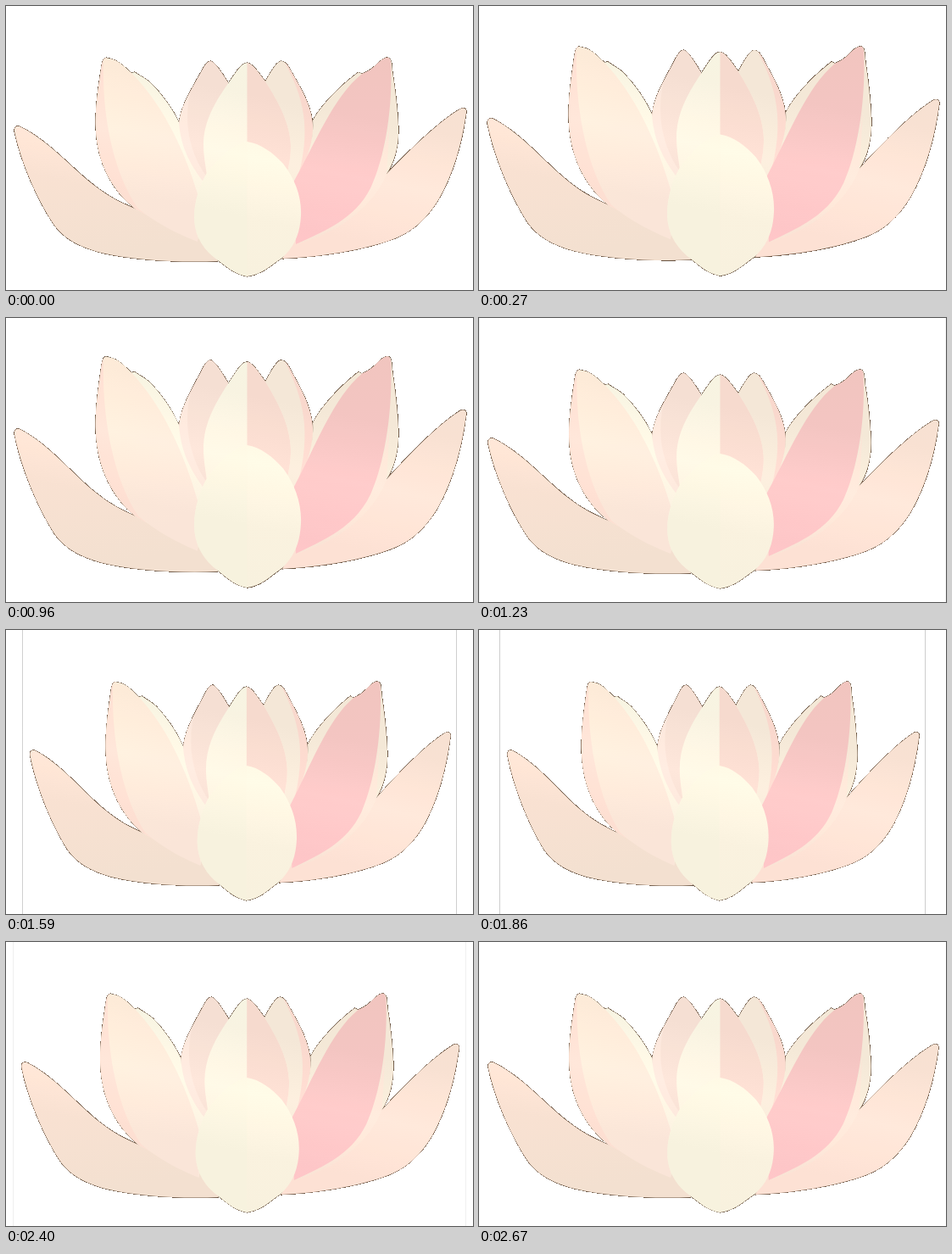
Write an HTML page that moves like this. It is 551x335 px and loops after 2.7 s.

```html
<!DOCTYPE html>
<html lang="en">
<head>
<meta charset="utf-8">
<title>Lotus</title>
<style>
  html, body { margin: 0; width: 100%; height: 100%; overflow: hidden; background: #fff; }
  svg { display: block; width: 551px; height: 335px; transform-origin: 50% 100%; }
  .edge { stroke: #66513f; stroke-width: 1.2; stroke-linejoin: round; shape-rendering: crispEdges; }
  .sheen { mix-blend-mode: color-dodge; }
</style>
</head>
<body>
<svg id="lotus" viewBox="0 0 551 335">
  <defs>
    <linearGradient id="outerLeft" x2="0.3" y2="1">
      <stop stop-color="#fce2d3"/><stop offset="1" stop-color="#f3e0d0"/>
    </linearGradient>
    <linearGradient id="outerRight" x1="1" x2="0.6" y2="1">
      <stop stop-color="#f7e1d2"/><stop offset="1" stop-color="#fde1d4"/>
    </linearGradient>
    <linearGradient id="faceLeft" x2="0.4" y2="1">
      <stop stop-color="#fdebd8"/><stop offset="1" stop-color="#fae5d8"/>
    </linearGradient>
    <linearGradient id="faceRight" x2="0" y2="1">
      <stop stop-color="#f1c5bf"/><stop offset="0.5" stop-color="#f5c5c3"/><stop offset="1" stop-color="#ffc6c8"/>
    </linearGradient>
    <linearGradient id="cream" x2="0" y2="1">
      <stop stop-color="#f7f4e2"/><stop offset="1" stop-color="#fbf0df"/>
    </linearGradient>
    <linearGradient id="front" x2="0" y2="1">
      <stop stop-color="#fcf3e0"/><stop offset="1" stop-color="#f8f1de"/>
    </linearGradient>
    <linearGradient id="sheen" gradientUnits="userSpaceOnUse" x1="291" y1="105" x2="263" y2="245">
      <stop stop-color="#000"/><stop offset="0.5" stop-color="#090909"/><stop offset="1" stop-color="#000"/>
    </linearGradient>

    <g id="flower">
      <!-- outer petals -->
      <path fill="url(#outerLeft)" d="M10 148C9 143 13 140 18 143C52 160 78 192 106 213C124 227 137 232 152 239L240 270L250 301C205 303 150 300 112 291C86 284 70 275 58 260C36 228 17 182 10 148Z"/>
      <path fill="url(#outerRight)" d="M543 126C544 121 540 119 535 122C508 138 474 172 449 198L340 270L326 298C372 296 422 288 457 275C481 266 497 250 510 229C528 198 538 162 543 126Z"/>

      <!-- inner petals -->
      <path fill="#f5dfd3" d="M242 65C238 64 234 70 230 78C217 101 204 122 204 143C204 170 220 192 234 212L286 200L262 90C256 81 248 67 242 65Z"/>
      <path fill="#f9e5da" d="M218 100C208 118 204 130 204 143C204 170 220 192 234 212L236 200C218 175 208 138 218 100Z"/>
      <path fill="#f4e7d7" d="M325 65C321 65 316 71 306 89L290 200L340 212C352 190 363 165 362 142C361 118 348 97 337 78C333 70 329 65 325 65Z"/>
      <path fill="#f9d8cd" d="M329 67C350 105 362 145 343 207C354 187 363 165 362 142C361 118 348 97 337 78C334 72 331 68 329 67Z"/>

      <!-- large left petal -->
      <path fill="url(#cream)" d="M118 61C113 62 113 70 111 82C107 108 105 128 106 146C108 188 127 219 152 239L226 277L235 210C219 190 206 168 204 137C194 116 180 100 170 90C163 84 157 82 152 78L148 79C141 73 135 66 126 63Z"/>
      <path fill="#fddfd2" d="M118 61C113 62 113 70 111 82C107 108 105 128 106 146C108 188 127 219 152 239L165 246C135 200 124 130 118 61Z"/>
      <path fill="url(#faceLeft)" d="M115 64C116 62 119 61 126 63C135 66 141 73 148 79C181 112 209 163 227 225L226 278C198 267 176 255 156 239C126 196 113 128 115 64Z"/>

      <!-- large right petal -->
      <path fill="#f4e8d7" d="M451 61C448 60 442 64 436 70C430 76 425 78 420 80L416 78C408 84 399 91 389 101C379 111 369 122 362 135C364 160 352 190 340 210L342 281C382 270 430 244 449 198C459 184 464 163 463 142C462 120 459 96 456 78C455 66 455 62 451 61Z"/>
      <path fill="#fae4d6" d="M454 120C452 162 436 214 406 240L342 281C382 270 430 244 449 198Z"/>
      <path fill="url(#faceRight)" d="M451 61C448 60 442 64 436 70C430 76 425 78 420 80C386 107 365 162 339 208L342 281C380 264 412 250 430 215C444 186 457 130 454 66C453 62 452 61 451 61Z"/>

      <!-- centre petal -->
      <path fill="url(#cream)" d="M284.500 67C278 67 272 77 263 90C249 110 233 134 233 164C233 178 236 190 237 200L330 205C333 192 336 180 336 165C335 138 322 114 306 89C297 77 291 68 284.500 67Z"/>
      <path fill="#f6dace" d="M284.500 67C291 68 297 77 306 89C322 114 335 138 336 165C336 180 333 192 330 205L284.500 200Z"/>

      <!-- front petal -->
      <path fill="url(#front)" d="M284.500 160C300 162 315 173 327 186C341 204 349 225 348 247C347 269 340 284 326 297C312 306 302 317 284.500 319C269 316 261 308 250 300C232 287 222 270 222 249C222 230 229 210 237 197C250 181 267 163 284.500 160Z"/>
      <path fill="#f7f2df" opacity=".7" d="M284.500 160L284.500 319C269 316 261 308 250 300C232 287 222 270 222 249C222 230 229 210 237 197C250 181 267 163 284.500 160Z"/>
    </g>
  </defs>
  <rect width="551" height="335" fill="#fff"/>
  <use href="#flower" class="edge"/>
  <use href="#flower"/>
  <rect width="551" height="335" fill="url(#sheen)" class="sheen"/>
</svg>
<script>
  const LOOP = 2700, STEP = 30;
  // [time, scaleX, scaleY]
  const KEYS = [[0, 1, 1], [675, 1, 1.12], [1215, 1, 1], [1755, 0.9, 1], [LOOP, 1, 1]];
  const lotus = document.getElementById('lotus');

  function draw(now) {
    const t = Math.floor((now % LOOP) / STEP) * STEP;
    const i = KEYS.findIndex(key => key[0] > t);
    const [from, to] = [KEYS[i - 1], KEYS[i]];
    const p = (t - from[0]) / (to[0] - from[0]);
    const mix = axis => from[axis] + (to[axis] - from[axis]) * p;
    lotus.style.transform = `scale(${mix(1)}, ${mix(2)})`;
  }

  const start = performance.now();
  function tick() {
    draw(performance.now() - start);
    requestAnimationFrame(tick);
  }
  tick();
</script>
</body>
</html>
```
